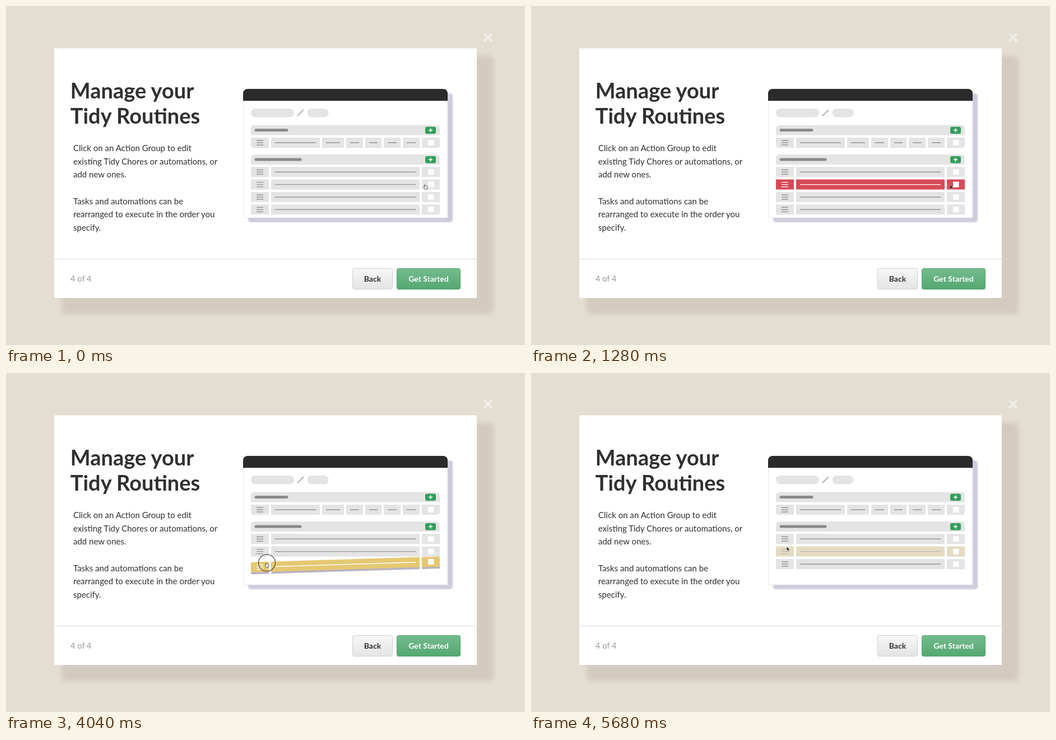
An HTML page for the animation above (5.72 s loop, 926 px wide and 605 px high).

```html
<!DOCTYPE html>
<html lang="en">
<head>
<meta charset="utf-8">
<title>Manage your Tidy Routines</title>
<style>
  html, body { margin: 0; width: 100%; height: 100%; overflow: hidden; background: #e4ddd1; }
  svg { display: block; width: 926px; height: 605px; }
  text { font-family: Lato, "Open Sans", sans-serif; fill: #303032; }
  .title { font-size: 38px; font-weight: 700; }
  .body { font-size: 15px; }
  .button { font-size: 14px; font-weight: 700; text-anchor: middle; }
</style>
</head>
<body>
<svg viewBox="0 0 926 605">
  <defs>
    <filter id="soft" x="-10%" y="-10%" width="120%" height="120%"><feGaussianBlur stdDeviation="4"/></filter>
    <filter id="slight"><feGaussianBlur stdDeviation="0.8"/></filter>
    <linearGradient id="light" x2="0" y2="1"><stop stop-color="#f7f7f7"/><stop offset="1" stop-color="#e4e4e6"/></linearGradient>
    <linearGradient id="green" x2="0" y2="1"><stop stop-color="#74bb8e"/><stop offset="1" stop-color="#54a870"/></linearGradient>
  </defs>
  <rect width="926" height="605" fill="#e4ddd1"/>
  <rect x="99" y="89" width="771" height="461" rx="8" fill="#d3cbc0" filter="url(#soft)"/>
  <path d="M853 49l14 14M867 49l-14 14" stroke="#efede9" stroke-width="4"/>
  <rect x="86" y="75.5" width="754" height="445.5" fill="#fff"/>
  <path d="M86 451.5H840" stroke="#dcdcdc"/>

  <text class="title" x="114.8" y="165">Manage your</text>
  <text class="title" x="114.8" y="210">Tidy Routines</text>
  <g id="copy"></g>
  <text x="115" y="492" style="font-size:14.7px;fill:#9b9b9b">4 of 4</text>

  <rect x="618.5" y="468.5" width="71" height="37" rx="3" fill="url(#light)" stroke="#d0d0d2"/>
  <text class="button" x="654" y="492">Back</text>
  <rect x="697.5" y="468.5" width="113" height="37" rx="3" fill="url(#green)" stroke="#53a36e"/>
  <text class="button" x="754" y="492" style="fill:#fff">Get Started</text>

  <rect x="432" y="156" width="365" height="230" rx="5" fill="#cfcbda" filter="url(#slight)"/>
  <path d="M423.5 378V156a8 8 0 0 1 8-8H780a8 8 0 0 1 8 8V378Z" fill="#fff" stroke="#e2e0e6" stroke-width=".8"/>
  <path d="M423 169.300V156a8 8 0 0 1 8-8H780a8 8 0 0 1 8 8v13.300Z" fill="#2b2b2c"/>
  <g fill="#e4e4e4">
    <rect x="437" y="183" width="77" height="15.500" rx="7.750"/>
    <rect x="537.500" y="183" width="38" height="15.500" rx="7.750"/>
  </g>
  <path d="M520 196L531 185" stroke="#8c8c8c" stroke-width="1.200"/>
  <g id="groups"></g>
  <g id="rows"></g>
  <circle id="ring" r="15" fill="none" stroke="#333" stroke-width="1.100"/>
  <g id="cursor">
    <path id="hand" d="M-2.600-3.600c1-.8 1.700.2 2 1.600l2.500.6c1.300.5 1.300 1.800 1 3.100l-.5 2.100h-3.800L-3.700.7c-.4-1 .6-1.400 1.500-.4Z" fill="#fff" stroke="#4a4a4a" stroke-width="1"/>
    <path id="arrow" d="M-1.500-4V3.200L.2 1.700 1.500 4.300 2.700 3.700 1.500 1.200H3.400Z" fill="#111" stroke="#fff" stroke-width=".4"/>
  </g>
</svg>
<script>
const LOOP = 5720;
const GREY = [228, 228, 228], INK = [150, 150, 150], WHITE = [255, 255, 255];
const RED = [209, 41, 58], YELLOW = [229, 200, 114];
const SLOTS = [296.3, 318.6, 341, 363.2];
const $ = id => document.getElementById(id);

function add(parent, tag, attrs) {
  const el = document.createElementNS("http://www.w3.org/2000/svg", tag);
  for (const key in attrs) el.setAttribute(key, attrs[key]);
  parent.appendChild(el);
  return el;
}
const set = (el, key, value) => el.setAttribute(key, value);

const ramp = (t, from, to) => Math.min(1, Math.max(0, (t - from) / (to - from)));
const ease = p => p < .5 ? 2 * p * p : 1 - 2 * (1 - p) ** 2;
const glide = (t, from, to) => ease(ramp(t, from, to));
const lerp = (a, b, p) => a + (b - a) * p;
const mix = (a, b, p) => `rgb(${a.map((v, i) => Math.round(lerp(v, b[i], p)))})`;
const pulse = (t, from, to) => Math.min(ramp(t, from, from + 80), 1 - ramp(t, to - 80, to));

const copy = ["Click on an Action Group to edit", "existing Tidy Chores or automations, or", "add new ones.", "",
  "Tasks and automations can be", "rearranged to execute in the order you", "specify."];
copy.forEach((line, i) => add($("copy"), "text", { class: "body", x: 120, y: 259 + i * 23.65 }).textContent = line);

function drawHeader(y, barEnd) {
  const g = $("groups");
  add(g, "path", { d: `M437 ${y + 18}v-12a6 6 0 0 1 6-6H768a6 6 0 0 1 6 6v12Z`, fill: "#e4e4e4" });
  add(g, "path", { d: `M446 ${y + 9}H${barEnd - 2}`, stroke: "#8a8a8a", "stroke-width": 5, "stroke-linecap": "round" });
  add(g, "rect", { x: 748, y: y + 3, width: 19, height: 12.5, rx: 3, fill: "#2f9f5b" });
  add(g, "path", { d: `M754 ${y + 9.2}h7m-3.5-3.500v7`, stroke: "#fff", "stroke-width": 1.7 });
}

// A row is drawn around its own centre line; y = 0 is the middle.
function makeRow(parent, cells, rounded) {
  const root = add(parent, "g", {});
  const corner = rounded ? 5 : 0;
  const boxes = `M437-9h32V9H${437 + corner}q${-corner} 0 ${-corner} ${-corner}Z` +
    cells.map(([a, b]) => `M${a}-9H${b}V9H${a}Z`).join("") +
    `M742-9h32V${9 - corner}q0 ${corner} ${-corner} ${corner}H742Z`;
  const shade = add(root, "path", { d: boxes, fill: "#b8b3bf", transform: "translate(0 3.500)", opacity: 0 });
  const fill = add(root, "path", { d: boxes, fill: mix(GREY, GREY, 0) });
  const lines = add(root, "path", {
    d: "M447-4h12M447 0h12M447 4h12" + cells.map(([a, b]) => `M${a + 7} 0H${b - 7}`).join(""),
    stroke: mix(INK, INK, 0), "stroke-width": 1.4
  });
  add(root, "rect", { x: 753, y: -5, width: 10.5, height: 10, fill: "#fff" });
  return { root, shade, fill, lines };
}
function placeRow(row, y, tilt = 0) {
  set(row.root, "transform", `translate(0 ${y}) rotate(${-tilt} 605.5 0)`);
}
function tintRow(row, color, amount) {
  set(row.fill, "fill", mix(GREY, color, amount));
  set(row.lines, "stroke", mix(INK, WHITE, amount));
}

drawHeader(212.5, 503);
placeRow(makeRow($("groups"), [[473, 560], [564, 603], [607, 637], [641, 670], [674, 704], [708, 738]], true), 244);
drawHeader(265, 527);
const [first, removed, second, dragged] = SLOTS.map(() => makeRow($("rows"), [[473, 738]]));
placeRow(first, SLOTS[0]);
placeRow(removed, SLOTS[1]);

function cursorAt(t) {
  const across = glide(t, 1890, 2800), drag = glide(t, 4000, 4640), rest = glide(t, 4900, 5400);
  return [749 - 283 * across - 7 * drag - rest, 323 + 20 * across - 25 * drag - 4 * rest];
}

function render(t) {
  tintRow(removed, RED, ramp(t, 300, 560));
  set(removed.root, "opacity", 1 - ramp(t, 1240, 1500));

  const close = glide(t, 1480, 1840);
  const swap = glide(t, 4040, 4740);
  const travel = (SLOTS[2] - SLOTS[1]) * swap;
  placeRow(second, lerp(SLOTS[2], SLOTS[1], close) + travel);

  const lift = glide(t, 3400, 3800);
  const raised = lift * (1 - swap);
  placeRow(dragged, lerp(SLOTS[3], SLOTS[2], close) + .6 * raised - travel, 1.75 * raised);
  tintRow(dragged, YELLOW, lift * (1 - ramp(t, 5200, 5900)));
  set(dragged.shade, "opacity", lift * (1 - ramp(t, 4600, 4800)));

  const [x, y] = cursorAt(t);
  set($("cursor"), "transform", `translate(${x} ${y})`);
  const pointing = t < 600 || (t >= 2840 && t < 4960);
  set($("hand"), "visibility", pointing ? "visible" : "hidden");
  set($("arrow"), "visibility", pointing ? "hidden" : "visible");

  const press = Math.max(pulse(t, 160, 520), pulse(t, 3040, 4920));
  set($("ring"), "opacity", press);
  set($("ring"), "transform", `translate(${x - .4} ${y - 4}) scale(${lerp(.7, 1, press)})`);
}

const start = performance.now();
function tick() {
  render((performance.now() - start) % LOOP);
  requestAnimationFrame(tick);
}
tick();
</script>
</body>
</html>
```
